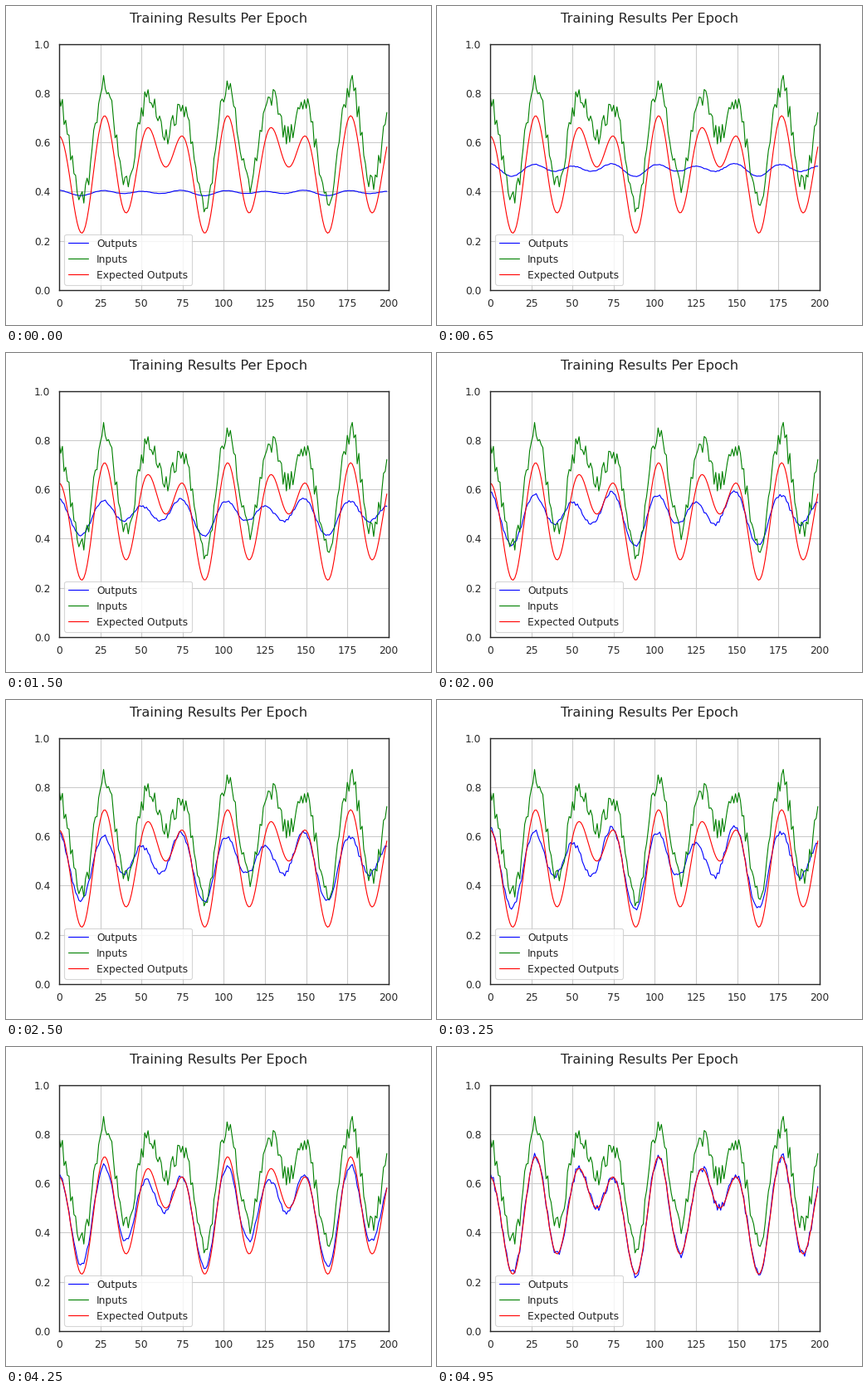
Write a matplotlib script that moves like this. It is 512 by 384 pixels and loops after 5 s.

```python
import numpy as np
import matplotlib.pyplot as plt
from matplotlib.animation import FuncAnimation

FRAMES, INTERVAL = 100, 50
PERIOD = 74.7
INK = "0.15"

plt.rcParams.update({
    "font.family": "DejaVu Sans",
    "text.color": INK,
    "axes.edgecolor": INK,
    "axes.linewidth": 1.25,
    "axes.axisbelow": True,
    "grid.color": "0.8",
    "grid.linewidth": 1,
    "lines.linewidth": 1,
    "lines.solid_capstyle": "round",
    "legend.fontsize": 11,
})


def harmonics(x, *terms):
    """Sum of overtones of PERIOD, each given as (amplitude, phase in degrees)."""
    turn = 2 * np.pi * x / PERIOD
    return sum(amp * np.cos(n * turn + np.radians(phase))
               for n, (amp, phase) in enumerate(terms, 1))


def smoothstep(t):
    t = np.clip(t, 0, 1)
    return t * t * (3 - 2 * t)


x = np.arange(200)
noise = np.random.default_rng(4).uniform(-.045, .045, x.size)

expected = .502 + harmonics(x, (.0586, 87.2), (.1026, 91.6), (.150, -33.7))
inputs = expected + .125 + noise

# The network first learns a wave that is out of phase, then the right one
rough = harmonics(x, (.0295, 106.1), (.062, 49.3), (.1047, -8.2))
rough += .25 * np.roll(noise, 1)
learned = expected + .4 * noise


def outputs(k):
    centre = .5 - .1035 * np.exp(-k / 5)
    gain = .065 + .935 * smoothstep(k / 68)
    mix = np.clip((k - 65) / 34, 0, 1)
    return (1 - mix) * (centre + gain * rough) + mix * learned


fig = plt.figure(figsize=(6.4, 4.8), dpi=80, facecolor="white")
ax = fig.add_axes([.125, .11, .775, .77])
fig.suptitle("Training Results Per Epoch", fontsize=14.65)
ax.set(xlim=(0, 200), ylim=(0, 1),
       xticks=np.arange(0, 201, 25), yticks=np.linspace(0, 1, 6))
ax.tick_params(length=0, pad=9.5, labelsize=11, labelcolor=INK)
ax.grid(True)

out_line, = ax.plot(x, outputs(0), color="blue", label="Outputs")
ax.plot(x, inputs, color="green", label="Inputs")
ax.plot(x, expected, color="red", label="Expected Outputs")
ax.legend(loc="lower left")


def update(k):
    out_line.set_ydata(outputs(k))
    return out_line,


anim = FuncAnimation(fig, update, frames=FRAMES, interval=INTERVAL,
                     repeat=True, repeat_delay=0)
plt.show()
```
